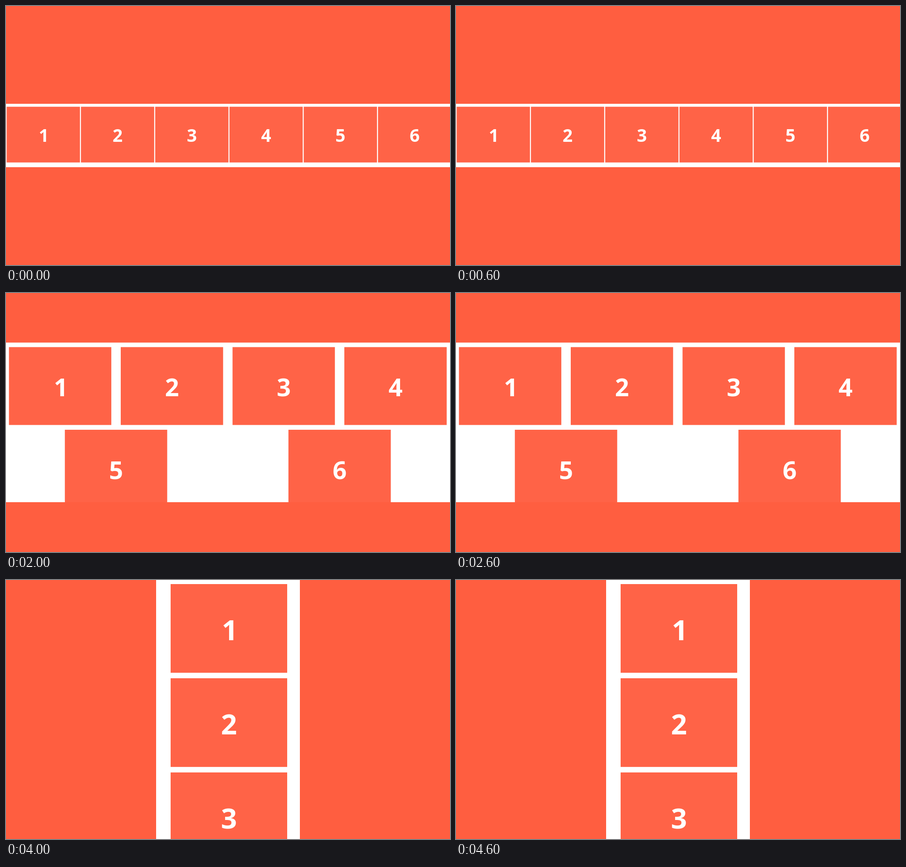
An HTML page for the animation above (5000 ms loop, 979 px wide and 572 px high).

```html
<!DOCTYPE html>
<html lang="en">
<head>
<meta charset="utf-8">
<title>Responsive grid</title>
<style>
  html, body { margin: 0; width: 100%; height: 100%; overflow: hidden; background: #ff5e40; }
  svg { display: block; width: 979px; height: 572px; }
  .scene { visibility: hidden; animation: show 5s step-end infinite; }
  .panel { fill: #fff; }
  .tile { fill: #ff6347; }
  text { fill: #fff; font-family: "Open Sans", "Noto Sans", sans-serif; font-weight: 700; text-anchor: middle; }
  @keyframes show {
    0% { visibility: visible; }
    20%, 100% { visibility: hidden; }
  }
</style>
</head>
<body>
<svg id="stage" viewBox="0 0 979 572"></svg>
<script>
// panel: x, y, w, h; tile: first x, first y, width; step: column, row; rows: column of each tile
const layouts = [
  { panel: [0, 216, 979, 140], tile: [1.5, 222.5, 161.5], step: [163.75, 0], rows: [[0, 1, 2, 3, 4, 5]] },
  { panel: [0, 140, 979, 292], tile: [2.4, 144.6, 190.6], step: [195.95, 154.5], rows: [[0, 1, 2, 3, 4], [2]] },
  { panel: [0, 109.5, 979, 352.5], tile: [6.5, 119.5, 225.7], step: [246.5, 182.5], rows: [[0, 1, 2, 3], [0.5, 2.5]] },
  { panel: [29, 83, 921, 406], tile: [42, 86.3, 257], step: [316.75, 208], rows: [[0, 1, 2], [0, 1, 2]] },
  { panel: [331, 0, 317, 572], tile: [363, 9, 257], step: [0, 208], rows: [[0], [0], [0]] }
];

const stage = document.getElementById("stage");

function add(parent, name, attrs) {
  const node = document.createElementNS("http://www.w3.org/2000/svg", name);
  for (const key in attrs) node.setAttribute(key, attrs[key]);
  return parent.appendChild(node);
}

function box(parent, cls, [x, y, width, height]) {
  return add(parent, "rect", { class: cls, x, y, width, height });
}

layouts.forEach(({ panel, tile: [x0, y0, w], step, rows }, i) => {
  const scene = add(stage, "g", { class: "scene", style: `animation-delay:${i - layouts.length}s` });
  box(scene, "panel", panel);
  const h = w * 0.762, size = h * 0.315, bottom = panel[1] + panel[3];
  let n = 0;
  rows.forEach((cols, r) => cols.forEach(c => {
    const x = x0 + c * step[0], y = y0 + r * step[1];
    box(scene, "tile", [x, y, w, Math.min(h, bottom - y)]);
    n++;
    const nudge = n === 1 ? size * 0.03 : 0;
    add(scene, "text", { x: x + w / 2 + nudge, y: y + h * 0.633, "font-size": size }).textContent = n;
  }));
});
</script>
</body>
</html>
```
